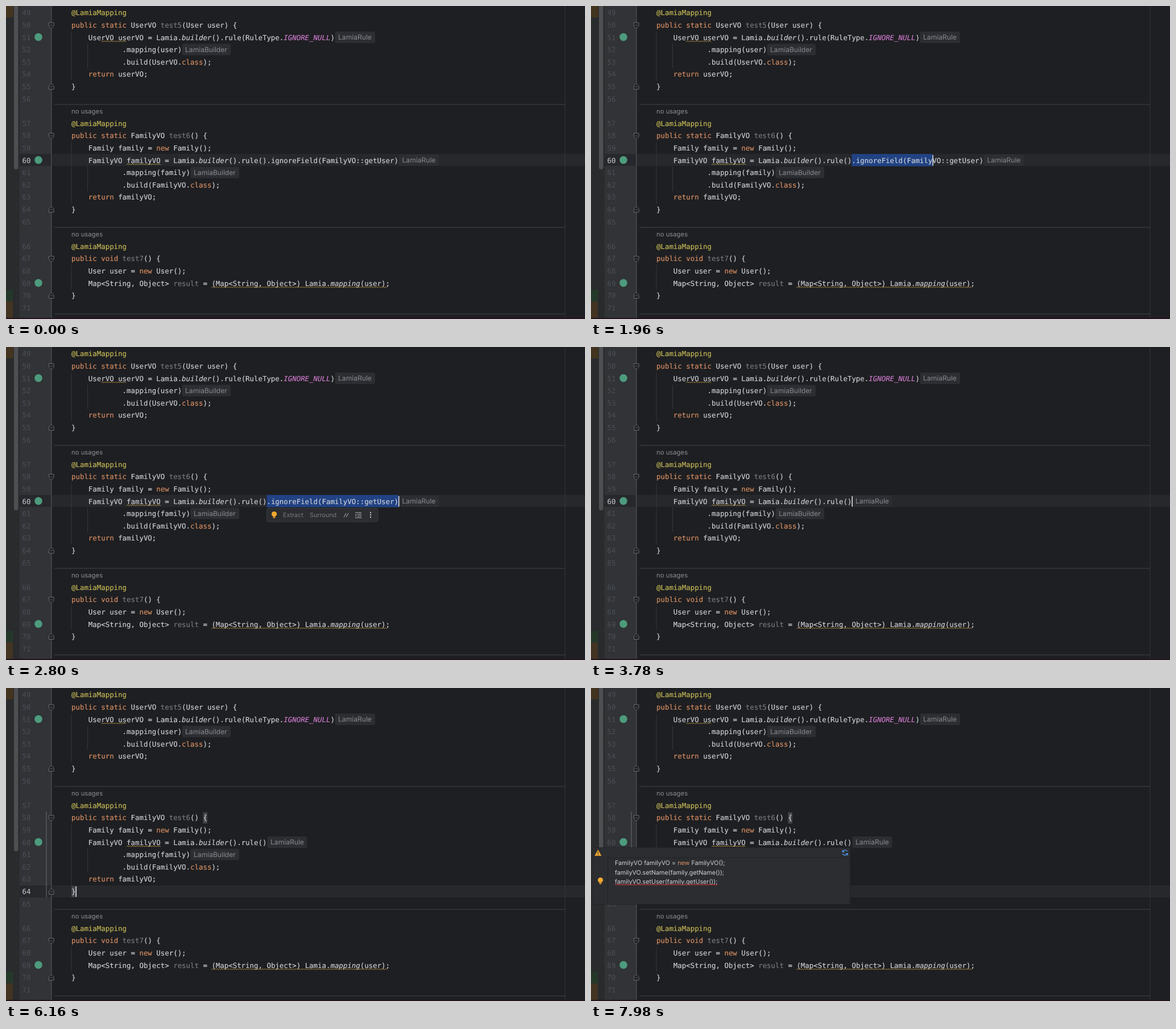
Recreate the animation shown at these times as an HTML page. Size 1018 by 550 pixels, loop 8 s.

```html
<!DOCTYPE html>
<html lang="en">
<head>
<meta charset="utf-8">
<title>Editor</title>
<style>
html, body { margin: 0; width: 100%; height: 100%; overflow: hidden; background: #1e1f22; }
svg { display: block; text-rendering: geometricPrecision; color: #d0d2d8; }
text, tspan { fill: currentColor; }
.code { font: 12.4px "DejaVu Sans Mono", monospace; }
.code tspan { stroke: currentColor; stroke-width: .15; }
.ui { font: 10.75px Inter, sans-serif; }
.hint { font: 12.1px Inter, sans-serif; color: #868a91; }
.usage { font: 11.3px Inter, sans-serif; color: #898d94; }
.num { color: #4b4f57; }
.on { color: #c0c2c9; }
.key { color: #dc9164; }
.note { color: #c8bc58; }
.dim { color: #777b82; }
.call { font-style: italic; }
.const { font-style: italic; color: #d07cd0; }
</style>
</head>
<body>
<svg id="stage" width="1018" height="550" viewBox="0 0 1018 550"></svg>
<script>
const stage = document.getElementById('stage');
const LOOP = 8000, ROW = 21.6, CH = 7.466, LEFT = 115;
const CLICK = 1050, DRAG = 1820, CUT = 3780, MOVE = 5180, POPUP = 6440;
const colX = c => LEFT + c * CH;
const mid = r => 12.2 + r * ROW;
const base = r => mid(r) + 4.1;
const rowTop = r => Math.round(mid(r) - 11);
const esc = s => s.replace(/&/g, '&amp;').replace(/</g, '&lt;');

const rect = (x, y, w, h, fill, more = '') =>
  `<rect x="${x}" y="${y}" width="${w}" height="${h}" fill="${fill}" ${more}/>`;
const path = (d, stroke, width = 1, fill = 'none') =>
  `<path d="${d}" stroke="${stroke}" stroke-width="${width}" fill="${fill}"/>`;
const label = (x, y, cls, s) => `<text x="${x}" y="${y}" class="${cls}">${s}</text>`;

// Timed layers: each group is visible from its start to its end
const layers = [];
function show(markup, from = 0, to = LOOP) {
  const g = document.createElementNS('http://www.w3.org/2000/svg', 'g');
  g.innerHTML = markup;
  stage.append(g);
  if (from > 0 || to < LOOP) layers.push({ g, from, to });
  return g;
}

function styleOf(word, before) {
  if (word[0] === '@') return 'note';
  if (/^(public|static|void|new|return|class)$/.test(word)) return 'key';
  if (/^(test\d|result)$/.test(word)) return 'dim';
  if (word === 'IGNORE_NULL') return 'const';
  return before.endsWith('Lamia.') ? 'call' : '';
}
function code(row, text, col = 0) {
  const parts = [...text.matchAll(/@\w+|\w+|[^\w\s]+/g)].map(m =>
    `<tspan x="${colX(col + m.index)}" class="${styleOf(m[0], text.slice(0, m.index))}">${esc(m[0])}</tspan>`);
  return `<text y="${base(row)}" class="code">${parts.join('')}</text>`;
}
const hint = (row, x, w, s) =>
  rect(x, mid(row) - 10.4, w, 20, '#2c2e32', 'rx="3"') + label(x + 5.5, base(row) - .2, 'hint', s);
const wave = (row, col, len) =>
  path(`M${colX(col)} ${base(row) + 3.6}` + 'l2 -2 2 2'.repeat(Math.round(len * CH / 4)), '#bd9b45', .9);
const bulb = (x, y) =>
  `<circle cx="${x}" cy="${y - 1.5}" r="4.6" fill="#f2a92f"/>` + rect(x - 2, y + 2, 4, 3.8, '#c98f35', 'rx="1"');
const brace = (row, col, n = 1) => rect(colX(col), mid(row) - 9.8, n * CH, 19.6, '#43454a');

const lines = [
  '@LamiaMapping',
  'public static UserVO test5(User user) {',
  '    UserVO userVO = Lamia.builder().rule(RuleType.IGNORE_NULL)',
  '            .mapping(user)',
  '            .build(UserVO.class);',
  '    return userVO;',
  '}', '', null,
  '@LamiaMapping',
  'public static FamilyVO test6() {',
  '    Family family = new Family();',
  '    FamilyVO familyVO = Lamia.builder().rule()',
  '            .mapping(family)',
  '            .build(FamilyVO.class);',
  '    return familyVO;',
  '}', '', null,
  '@LamiaMapping',
  'public void test7() {',
  '    User user = new User();',
  '    Map<String, Object> result = (Map<String, Object>) Lamia.mapping(user);',
  '}', ''
];

// Window and gutter
show(rect(0, 0, 1018, 550, '#1e1f22') + rect(0, 0, 24, 550, '#292b2d') +
  rect(24, 0, 56, 550, '#313336') + rect(0, 0, 13, 20, '#433420') +
  rect(0, 499, 12, 20, '#24382a') + rect(0, 519, 12, 29, '#433422') +
  rect(14, -8, 7.5, 295, '#4d4f51', 'rx="3.5"'));

const activeRow = r => rect(24, rowTop(r), 994, 21, '#26282c');
show(activeRow(12), 0, MOVE);
show(activeRow(16), MOVE);

const guide = (x, y1, y2) => path(`M${x} ${y1}V${y2}`, '#34373b');
show(path('M79.8 0V550', '#515459', 1.2) + path('M983 0V550', '#35373b') +
  [173, 389, 541].map(y => path(`M85 ${y}H983`, '#414347')).join('') +
  [[115, 45, 131], [143.5, 67, 109], [115, 239, 347], [143.5, 282, 325], [115, 455, 498]]
    .map(a => guide(...a)).join('') +
  [[1, 1], [6, -1], [10, 1], [16, -1], [20, 1], [23, -1]].map(([r, d]) =>
    path(`M75.5 ${mid(r) - 4.5 * d}h8.6v${6 * d}l-4.3 ${4 * d}l-4.3 ${-4 * d}zM77.6 ${mid(r)}h4.4`,
      '#686b70', 1, '#1e1f22')).join(''));

// Highlights behind the text
show(brace(12, 44, 2), CLICK, DRAG);
show(brace(12, 44, 2), CUT + 70, MOVE);
show(brace(10, 31) + brace(16, 0) + path('M71 217V368', '#696c71'), MOVE + 70);
const selection = show(rect(colX(46), rowTop(12), 0, 21.6, '#214283'), DRAG, CUT).firstChild;

let number = 49;
show(lines.map((s, r) => s === null
  ? label(115, base(r) - .5, 'usage', 'no usages')
  : label(28.6, base(r), 'code num', number++) + code(r, s)).join(''));
show(label(28.6, base(12), 'code on', 60), 0, MOVE);
show(label(28.6, base(16), 'code on', 64), MOVE);
show(code(12, '.ignoreField(FamilyVO::getUser)', 46), 0, CUT);

show(wave(2, 7, 6) + wave(12, 13, 8) + wave(22, 33, 41) +
  [2, 12, 22].map(r => `<circle cx="57" cy="${mid(r) - .8}" r="6.8" fill="#4d9b7d"/>`).join('') +
  hint(2, 578.5, 70.5, 'LamiaRule') + hint(3, 309.5, 85.5, 'LamiaBuilder') +
  hint(13, 324.5, 85.5, 'LamiaBuilder'));
show(hint(12, 691, 70, 'LamiaRule'), 0, CUT);
show(hint(12, 459.5, 70, 'LamiaRule'), CUT);
show(bulb(97, 271), 4760, MOVE);

const caret = show(rect(0, 0, 1.6, 18.6, '#dcdee4')).firstChild;

// Floating toolbar
show(rect(458.5, 283.5, 195.5, 23.5, '#2b2d30', 'rx="3" stroke="#3a3c40"') + bulb(471.5, 295) +
  label(487, 299, 'ui dim', 'Extract') + label(534, 299, 'ui dim', 'Surround') +
  path('M594 299l4 -7M598 299l4 -7', '#b9bbc1') +
  path('M614 291h11M618 294h7M618 297h7M614 300h11M614 293.5l2.5 2 -2.5 2', '#b9bbc1') +
  [291, 295, 299].map(y => `<circle cx="641" cy="${y}" r="1.2" fill="#c3c5cb"/>`).join(''), 2800, CUT);

// Preview popup
show(rect(4, 281, 451, 99, '#2b2d30') + path('M4 280.5H455.5V380H4', '#222326') +
  path('M29.5 380V298H455', '#1f2023') +
  path('M12.4 285.2L17.4 294.2H7.4Z', '#f2a92f', 1.2, '#f2a92f') + path('M12.4 287.8v3.4M12.4 292v1.4', '#2b2d30', 1.2) +
  path('M450.8 287.2a4.4 4.4 0 0 0 -8 .6M442.4 284.6v3.4h3.4M442.4 291a4.4 4.4 0 0 0 8 .4M451.2 294.4v-3.4h-3.4',
    '#4a90d9', 1.4) + bulb(16.5, 339) +
  label(42, 311, 'ui', 'FamilyVO familyVO = <tspan class="key">new</tspan> FamilyVO();') +
  label(42, 327.5, 'ui', 'familyVO.setName(family.getName());') +
  label(42, 344, 'ui', 'familyVO.setUser(family.getUser());') +
  path('M42 345.6H222.5', '#c9343c', 1.3), POPUP);
show(rect(0, 548, 1018, 2, '#24121c'));

// Drag steps: time and number of selected characters
const drag = [[1820, 4], [1890, 12], [1960, 19], [2030, 22], [2100, 25], [2240, 27], [2310, 29], [2380, 31]];

function draw(now) {
  const t = now % LOOP;
  for (const { g, from, to } of layers) g.style.display = t >= from && t < to ? '' : 'none';

  const selected = drag.reduce((n, [at, count]) => t >= at ? count : n, 0);
  selection.setAttribute('width', selected * CH);

  const onBrace = t >= MOVE;
  const visible = t >= CLICK && !(t >= 3080 && t < 3570) && t < POPUP;
  caret.style.display = visible ? '' : 'none';
  caret.setAttribute('x', onBrace ? colX(1) : colX(46 + (t < CUT ? selected : 0)));
  caret.setAttribute('y', mid(onBrace ? 16 : 12) - 9.4);
  requestAnimationFrame(draw);
}
draw(0);
</script>
</body>
</html>
```
